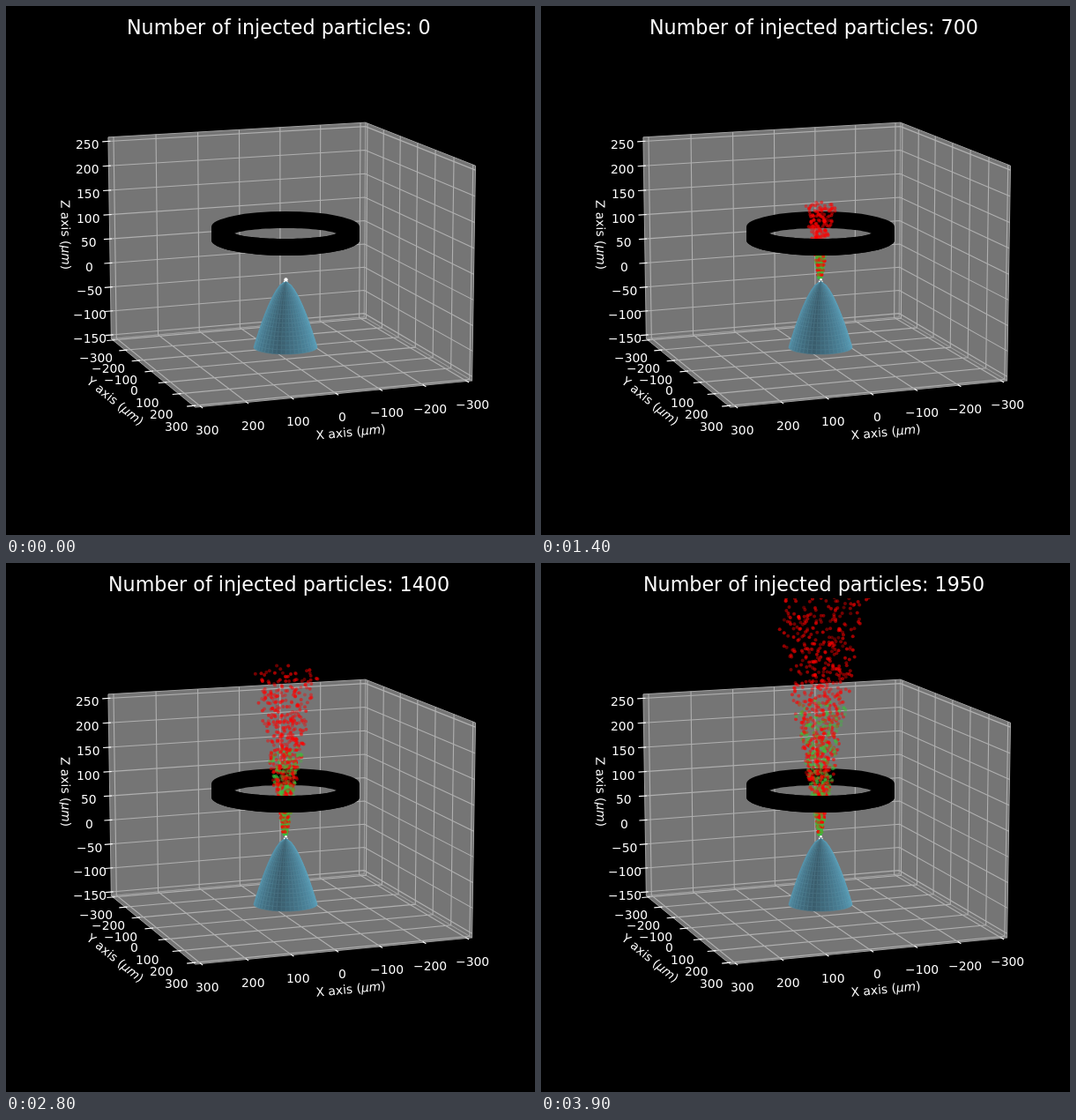
Write an HTML page with a canvas that moves like this. It is 600 px wide and 600 px high and loops after 4000 ms.

```html
<!DOCTYPE html>
<html lang="en">
<head>
<meta charset="utf-8">
<style>
  html, body { margin: 0; width: 100%; height: 100%; overflow: hidden; background: #000; }
  canvas { display: block; }
</style>
</head>
<body>
<canvas id="stage" width="600" height="600"></canvas>
<script>
const ctx = document.getElementById('stage').getContext('2d');
const STEP = 100, STEPS = 40, PER_STEP = 50, DRAWN_PER_STEP = 32;
const L = 312.5, BOTTOM = -158.3, TOP = 258.3;
const FONT = '"DejaVu Sans", sans-serif';
const rad = deg => deg * Math.PI / 180;
const sinA = Math.sin(rad(70)), cosA = Math.cos(rad(70));
const sinE = Math.sin(rad(12)), cosE = Math.cos(rad(12));

// Perspective camera: azimuth 70°, elevation 12°, distance 10.
function project(x, y, z) {
  x *= 0.0018288; y *= 0.0018288; z = (z - 50) * 0.002057;
  const ahead = x * cosA + y * sinA;
  const scale = 2815 / (10 - cosE * ahead - sinE * z);
  return [317.2 + (y * cosA - x * sinA) * scale, 283.5 - (cosE * z - sinE * ahead) * scale];
}

function trace(points, close) {
  ctx.beginPath();
  points.forEach(p => ctx.lineTo(...p));
  if (close) ctx.closePath();
}

function line(color, width, ...points) {
  trace(points.map(p => project(...p)));
  ctx.strokeStyle = color;
  ctx.lineWidth = width;
  ctx.stroke();
}

function pane(...points) {
  trace(points.map(p => project(...p)), true);
  ctx.fillStyle = '#757575';
  ctx.fill();
  ctx.strokeStyle = '#a0a0a0';
  ctx.lineWidth = 1;
  ctx.stroke();
}

function dot(x, y, r, color) {
  ctx.fillStyle = color;
  ctx.beginPath();
  ctx.arc(x, y, r, 0, 7);
  ctx.fill();
}

// Centred text whose left edge and baseline sit on whole pixels.
function centred(text, size, x, baseline) {
  ctx.font = `${size}px ${FONT}`;
  ctx.textAlign = 'left';
  ctx.fillStyle = '#fff';
  ctx.fillText(text, Math.round(x - ctx.measureText(text).width / 2), Math.round(baseline));
}

function label(value, x, y) {
  centred(String(value).replace('-', '\u2212'), 13.89, x, y + 5);
}

function axisTitle(name, x, y, degrees) {
  const parts = [[`${name} axis (`, ''], ['μm', 'italic '], [')', '']];
  const setFont = style => { ctx.font = `${style}13.89px ${FONT}`; };
  const widths = parts.map(([s, style]) => { setFont(style); return ctx.measureText(s).width; });
  ctx.save();
  ctx.translate(x, y);
  ctx.rotate(rad(degrees));
  ctx.textAlign = 'left';
  ctx.fillStyle = '#fff';
  let left = -widths.reduce((a, b) => a + b) / 2;
  parts.forEach(([s, style], i) => {
    setFont(style);
    ctx.fillText(s, left, 5);
    left += widths[i];
  });
  ctx.restore();
}

function drawAxes() {
  pane([-L, -L, BOTTOM], [-L, L, BOTTOM], [-L, L, TOP], [-L, -L, TOP]);
  pane([-L, -L, BOTTOM], [L, -L, BOTTOM], [L, -L, TOP], [-L, -L, TOP]);
  pane([-L, -L, BOTTOM], [L, -L, BOTTOM], [L, L, BOTTOM], [-L, L, BOTTOM]);

  const grid = '#b0b0b0', ticks = [];
  for (let v = -300; v <= 300; v += 100) {
    line(grid, 1.1, [v, L, BOTTOM], [v, -L, BOTTOM], [v, -L, TOP]);
    line(grid, 1.1, [L, v, BOTTOM], [-L, v, BOTTOM], [-L, v, TOP]);
    ticks.push([[v, L + 12, BOTTOM], [v, L - 5, BOTTOM]], [[L + 14, v, BOTTOM], [L - 5, v, BOTTOM]]);
    let [x, y] = project(v, L, BOTTOM);
    label(v, x + 7, y + 26.5);
    [x, y] = project(L, v, BOTTOM);
    label(v, x - 19.3, y + 22.2 + v * 0.006);
  }
  for (let v = -150; v <= 250; v += 50) {
    line(grid, 1.1, [L, -L, v], [-L, -L, v], [-L, L, v]);
    ticks.push([[L + 14, -L, v], [L - 5, -L, v]]);
    label(v, 94.2 - v * 0.0075, project(L, -L, v)[1] + 4);
  }
  ticks.forEach(t => line('#fff', 1.1, ...t));
  axisTitle('X', 391, 483, -5.5);
  axisTitle('Y', 124, 448, 39);
  axisTitle('Z', 68, 259.5, 89);
}

function drawCone() {
  const cols = 22, rows = 16;
  const at = (i, j) => {
    const h = j / rows, r = Math.pow(h, 0.62), a = Math.PI * i / cols;
    return [317 + 36 * r * Math.cos(a), 312 + 75 * h + 8 * r * Math.sin(a)];
  };
  ctx.lineWidth = 0.5;
  for (let i = 0; i < cols; i++) {
    const k = Math.abs(Math.PI * (i + 0.5) / cols - 1.8) / 1.8;
    const color = `rgb(${58 + 32 * k},${92 + 70 * k},${108 + 82 * k})`;
    for (let j = 0; j < rows; j++) {
      trace([at(i, j), at(i + 1, j), at(i + 1, j + 1), at(i, j + 1)], true);
      ctx.fillStyle = ctx.strokeStyle = color;
      ctx.fill();
      ctx.stroke();
      ctx.strokeStyle = 'rgba(125,190,212,.2)';
      ctx.stroke();
    }
  }
}

function drawRing(frontOnly) {
  ctx.save();
  if (frontOnly) {
    ctx.beginPath();
    ctx.rect(225, 258, 185, 30);
    ctx.clip();
  }
  ctx.beginPath();
  ctx.ellipse(317, 250.5, 84, 17.5, 0, Math.PI, 0);
  ctx.ellipse(317, 265.5, 84, 17.5, 0, 0, Math.PI);
  ctx.closePath();
  ctx.moveTo(259, 258);
  ctx.bezierCurveTo(278, 250, 356, 250, 375, 258);
  ctx.bezierCurveTo(356, 266, 278, 266, 259, 258);
  ctx.fillStyle = '#000';
  ctx.fill('evenodd');
  ctx.restore();
}

let seed = 7;
function random() {
  seed = (seed * 16807) % 2147483647;
  return seed / 2147483647;
}

const particles = Array.from({ length: (STEPS - 1) * DRAWN_PER_STEP }, (_, i) => ({
  born: Math.floor(i / DRAWN_PER_STEP),
  green: i % 10 > 6,
  speed: 1.01 - 0.12 * random(),
  side: Math.sqrt(random()) * Math.cos(random() * 2 * Math.PI),
  alpha: 0.35 + 0.3 * random(),
  order: random()
})).sort((a, b) => a.order - b.order);

function drawParticles(step) {
  ctx.save();
  ctx.beginPath();
  ctx.rect(0, 40, 600, 560);
  ctx.clip();
  for (const p of particles) {
    const age = step - p.born;
    if (age <= 0) continue;
    const rise = p.speed * (p.green ? 2.5 * age + 0.04 * age * age : 5.5 * age + 0.048 * age * age);
    const x = 316.5 + p.side * (1.5 + 0.2 * rise);
    dot(x, 310 - rise, 2, `rgba(${p.green ? '60,190,60' : '255,0,0'},${p.alpha})`);
  }
  ctx.restore();
}

function draw(step) {
  ctx.fillStyle = '#000';
  ctx.fillRect(0, 0, 600, 600);
  drawAxes();
  drawCone();
  drawRing(false);
  drawParticles(step);
  drawRing(true);
  dot(317.5, 310.3, step ? 1.3 : 2.1, '#fff');
  dot(315.7, 312.3, 0.9, '#fff');
  dot(319, 312.2, 0.7, '#fff');
  centred(`Number of injected particles: ${step * PER_STEP}`, 22.22, 309.7, 32);
}

let shown = -1;
function tick() {
  const step = Math.floor(performance.now() / STEP) % STEPS;
  if (step !== shown) draw(shown = step);
  requestAnimationFrame(tick);
}
tick();
</script>
</body>
</html>
```
